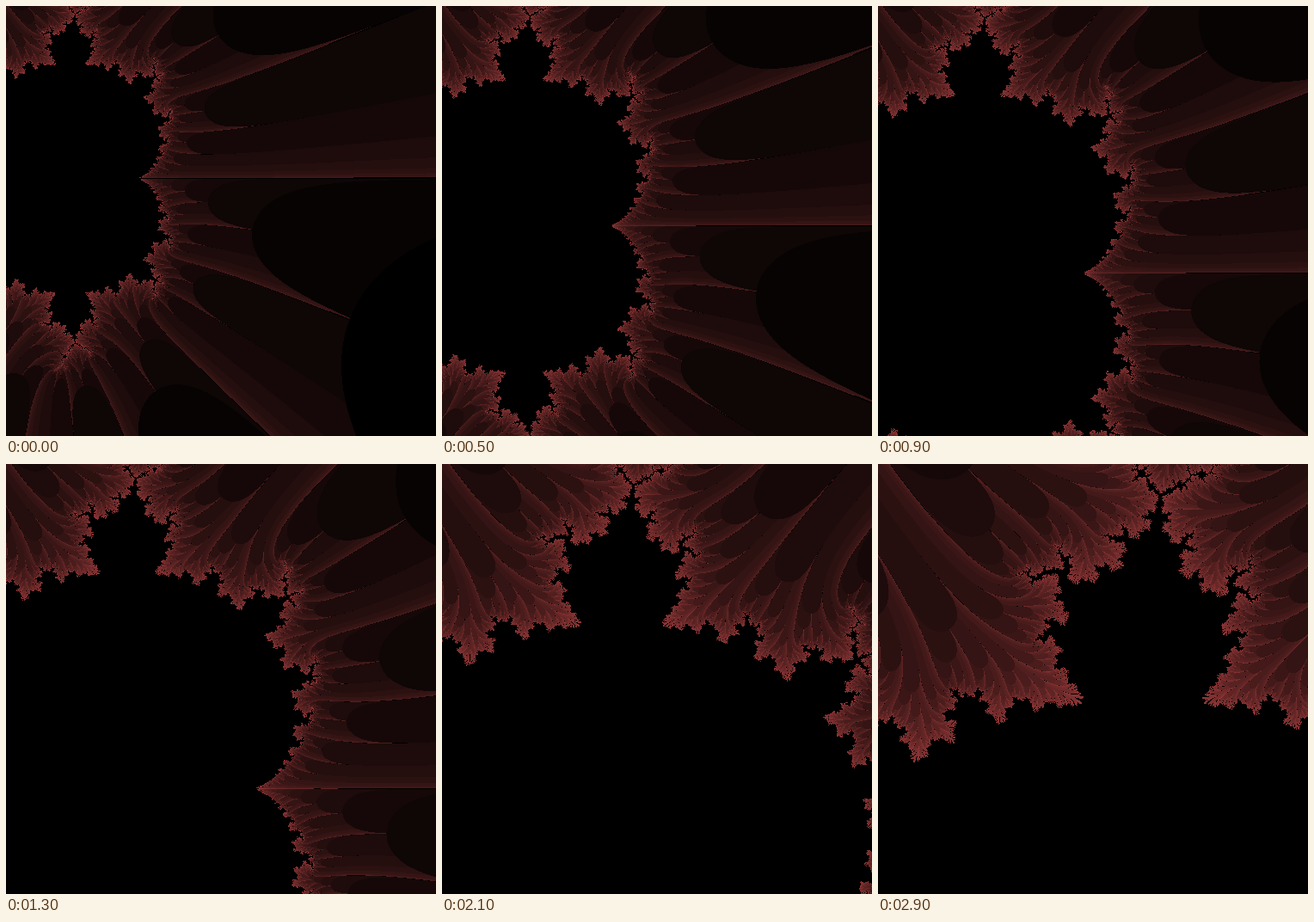
Recreate the animation shown at these times as an HTML page with a canvas. Size 500 by 500 pixels, loop 3000 ms.

```html
<!DOCTYPE html>
<html lang="en">
<head>
<meta charset="utf-8">
<title>Mandelbrot zoom</title>
<style>
  html, body { margin: 0; width: 100%; height: 100%; overflow: hidden; background: #000; }
  canvas { display: block; width: 500px; height: 500px; }
</style>
</head>
<body>
<canvas id="stage" width="500" height="500"></canvas>
<script>
const SIZE = 500, STEPS = 30, STEP_MS = 100;
const SCALE = 200, ZOOM = 1.05, PAN_X = 0.5, PAN_Y = 1;
const MAX_ITER = 20, BAILOUT = 10;
const SATURATION = 0.45, LIGHT_STEP = 0.02;

const ctx = document.getElementById('stage').getContext('2d');
const image = ctx.createImageData(SIZE, SIZE);
const pixels = new Uint32Array(image.data.buffer);

// Packed ABGR shades of red; the last entry is the set itself.
const shades = Array.from({ length: MAX_ITER + 1 }, (_, i) => {
  const light = i < MAX_ITER ? i * LIGHT_STEP : 0;
  const hi = Math.round(255 * light * (1 + SATURATION));
  const lo = Math.round(255 * light * (1 - SATURATION));
  return (255 << 24 | lo << 16 | lo << 8 | hi) >>> 0;
});

// Escape is judged by the product re * im, which makes the halo asymmetric.
function escapeTime(cx, cy) {
  let re = cx, im = cy;
  for (let i = 0; i < MAX_ITER; i++) {
    const next = re * re - im * im + cx;
    im = 2 * re * im + cy;
    re = next;
    if (re * im > BAILOUT) return i;
  }
  return MAX_ITER;
}

function draw(step) {
  const scale = SCALE * ZOOM ** step;
  for (let y = 0, p = 0; y < SIZE; y++) {
    const cy = y / scale - PAN_Y;
    for (let x = 0; x < SIZE; x++) {
      pixels[p++] = shades[escapeTime(x / scale - PAN_X, cy)];
    }
  }
  ctx.putImageData(image, 0, 0);
}

const start = performance.now();
let shown = -1;

function tick() {
  const step = Math.floor((performance.now() - start) / STEP_MS) % STEPS;
  if (step !== shown) draw(shown = step);
  requestAnimationFrame(tick);
}
tick();
</script>
</body>
</html>
```
